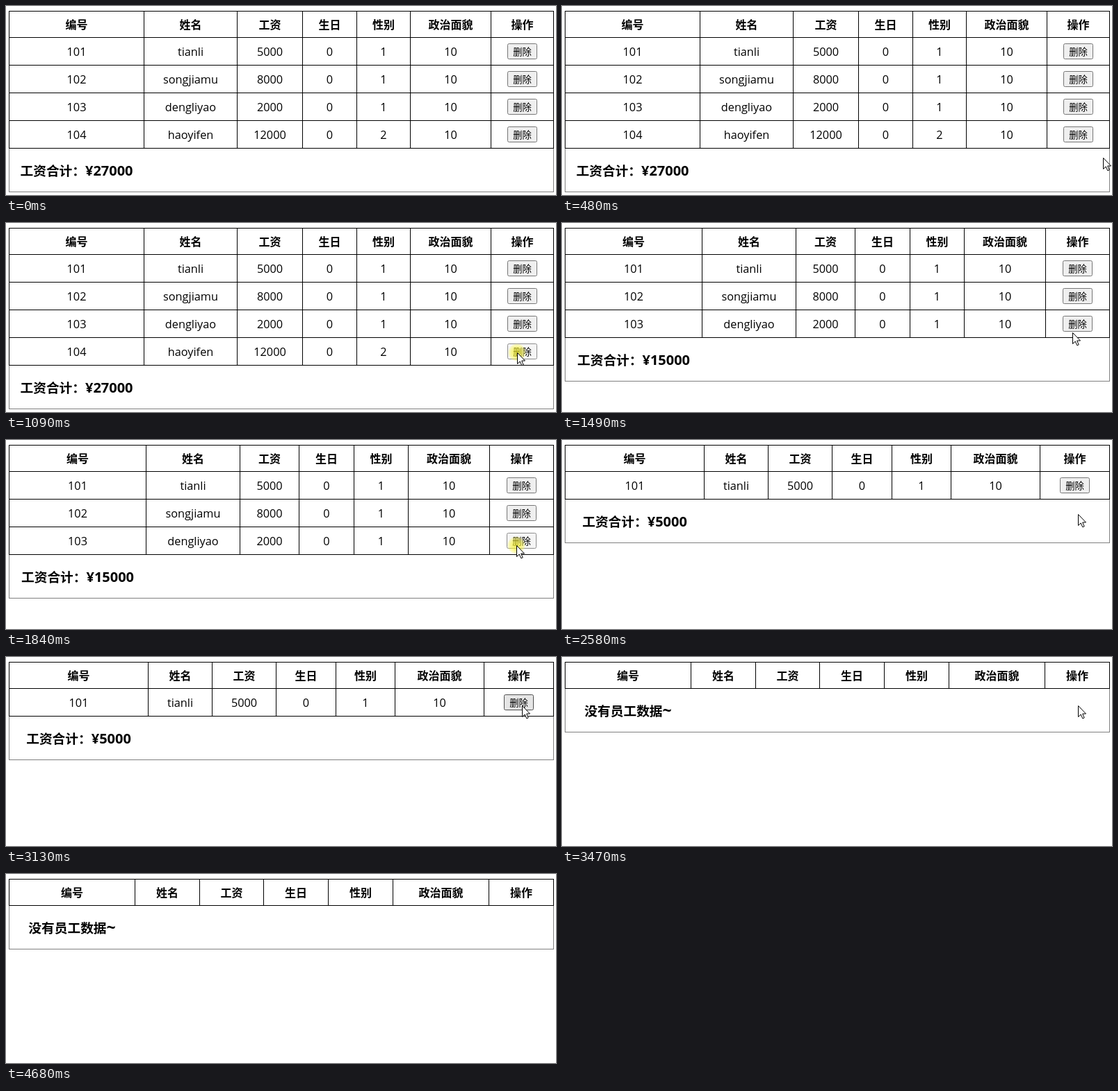
These frames come from a looping animation (791x273 px, 5.01 s). An HTML page:

```html
<!DOCTYPE html>
<html lang="zh-CN">
<head>
<meta charset="utf-8">
<title>工资表</title>
<style>
html, body { margin: 0; width: 100%; height: 100%; overflow: hidden; background: #fff; }
svg { display: block; font-family: "Open Sans", "Noto Sans CJK SC", "Noto Sans CJK", sans-serif; text-anchor: middle; }
.head { font-size: 16px; font-weight: 700; }
.cell { font-size: 16.3px; }
.foot { font-size: 18.72px; font-weight: 700; }
.label { font-size: 13.33px; }
</style>
</head>
<body>
<svg width="791" height="273" viewBox="0 0 791 273">
  <defs>
    <radialGradient id="glow">
      <stop offset="0" stop-color="#f4ee20" stop-opacity=".7"/>
      <stop offset=".6" stop-color="#fbf530" stop-opacity=".55"/>
      <stop offset="1" stop-color="#fffa40" stop-opacity=".2"/>
    </radialGradient>
  </defs>
  <g id="table"></g>
  <g id="pointer">
    <circle id="press" r="12.5" fill="url(#glow)"/>
    <path d="M.5 .5V16.5L4.2 13L6.8 18.8L9.2 17.8L6.7 12H11.5Z" fill="#fff" stroke="#000"/>
  </g>
</svg>
<script>
const LOOP = 5010, TICK = 67.9;
const LEFT = 4, RIGHT = 787, HEAD_BOTTOM = 45, ROW = 40, FOOT = 63;
const CELL_PADDING = 33, FOOT_PADDING = 1.3, BUTTON = 43;
const DARK = '#000', GRAY = '#808080';
const HEADS = ['编号', '姓名', '工资', '生日', '性别', '政治面貌', '操作'];
const STAFF = [
  [101, 'tianli', 5000, 0, 1, 10],
  [102, 'songjiamu', 8000, 0, 1, 10],
  [103, 'dengliyao', 2000, 0, 1, 10],
  [104, 'haoyifen', 12000, 0, 2, 10],
];

const easeOut = u => 1 - (1 - u) ** 2.5;
const easeIn = u => u * u;
const ENTRY = { x: 619, y: 4 };
const MOVES = [
  { from: 1, to: 7, x: 778, y: 219, ease: easeOut },
  { from: 7, to: 12, x: 735, y: 187, ease: easeOut },
  { from: 19, to: 25, x: 734, y: 152, ease: easeOut },
  { from: 29, to: 33, x: 742, y: 107, ease: easeOut },
  { from: 39, to: 46, x: 742, y: 70, ease: easeOut },
  { from: 60, to: 68, x: 601, y: -18, ease: easeIn },
];
const PRESSES = [16, 27, 36, 49];
const DELETE_DELAY = 2;

const table = document.getElementById('table');
const pointer = document.getElementById('pointer');
const press = document.getElementById('press');
const ruler = document.createElement('canvas').getContext('2d');

const rect = (x, y, w, h, fill) =>
  `<rect x="${x}" y="${y}" width="${w}" height="${h}" fill="${fill}"/>`;
const text = (cls, x, y, content) => `<text class="${cls}" x="${x}" y="${y}">${content}</text>`;

function measure(content, size, weight = 400) {
  ruler.font = `${weight} ${size}px "Open Sans", "Noto Sans CJK SC", "Noto Sans CJK", sans-serif`;
  return ruler.measureText(content).width;
}

function pointerAt(tick) {
  if (tick < MOVES[0].from || tick > MOVES[MOVES.length - 1].to) return null;
  let { x, y } = ENTRY;
  for (const move of MOVES) {
    if (tick < move.from) break;
    const u = move.ease(Math.min(1, (tick - move.from) / (move.to - move.from)));
    x += (move.x - x) * u;
    y += (move.y - y) * u;
  }
  return { x: Math.round(x), y: Math.round(y) };
}

function footer(rows) {
  if (!rows.length) return { label: '没有员工数据', tail: '~', size: 23 };
  const total = rows.reduce((sum, row) => sum + row[2], 0);
  return { label: '工资合计\uFF1A', tail: '¥' + total, size: 20 };
}

// Columns share the table width in proportion to their widest content;
// the footer text sits in the first column.
function columnEdges(rows, foot) {
  const widths = HEADS.map((head, i) => CELL_PADDING + Math.max(
    measure(head, 16, 700),
    ...rows.map(row => i < row.length ? measure(row[i], 16.3) : BUTTON)));
  widths[0] = FOOT_PADDING + measure(foot.label, 18.72, 700) + measure(foot.tail, foot.size, 700);
  const scale = (RIGHT - LEFT) / widths.reduce((a, b) => a + b);
  let x = LEFT;
  return [LEFT, ...widths.map(w => Math.round(x += w * scale))];
}

function button(center, top, pos, pressed) {
  const x = Math.floor(center - BUTTON / 2), y = top + 9;
  const over = pos && pos.x >= x && pos.x < x + BUTTON && pos.y >= y && pos.y < y + 23;
  const [fill, stroke] = !over ? ['#efefef', '#767676']
    : pressed ? ['#f5f5f5', '#8d8d8d'] : ['#e5e5e5', '#4f4f4f'];
  return `<rect x="${x + .5}" y="${y + .5}" width="${BUTTON - 1}" height="22" rx="2" fill="${fill}" stroke="${stroke}"/>`
    + text('label', x + BUTTON / 2, y + 17, '删除');
}

function drawTable(count, pos, pressed) {
  const rows = STAFF.slice(0, count);
  const foot = footer(rows);
  const edges = columnEdges(rows, foot);
  const center = i => (edges[i] + edges[i + 1] + 1) / 2;
  const bottom = HEAD_BOTTOM + ROW * count;
  const rule = (y, color) => rect(LEFT, y, RIGHT - LEFT + 1, 1, color);

  let out = [LEFT, RIGHT].map(x => rect(x, bottom, 1, FOOT, GRAY)).join('')
    + rule(bottom + FOOT, GRAY) + rule(7, DARK) + rule(HEAD_BOTTOM, DARK)
    + edges.map(x => rect(x, 7, 1, bottom - 6, DARK)).join('')
    + HEADS.map((head, i) => text('head', center(i), 33, head)).join('');
  rows.forEach((row, r) => {
    const top = HEAD_BOTTOM + ROW * r;
    out += rule(top + ROW, DARK)
      + row.map((value, i) => text('cell', center(i), top + 27, value)).join('')
      + button(center(row.length), top, pos, pressed);
  });
  return out + text('foot', center(0), bottom + 40,
    `${foot.label}<tspan font-size="${foot.size}">${foot.tail}</tspan>`);
}

let shown = -1;
function render(time) {
  const tick = Math.floor((time % LOOP + 10) / TICK);
  if (tick === shown) return;
  shown = tick;
  const pos = pointerAt(tick);
  const pressed = PRESSES.includes(tick);
  const count = PRESSES.filter(p => tick < p + DELETE_DELAY).length;
  table.innerHTML = drawTable(count, pos, pressed);
  pointer.style.display = pos ? '' : 'none';
  if (pos) pointer.setAttribute('transform', `translate(${pos.x} ${pos.y})`);
  press.style.display = pressed ? '' : 'none';
}

const start = performance.now();
function frame() {
  render(performance.now() - start);
  requestAnimationFrame(frame);
}
frame();
</script>
</body>
</html>
```
